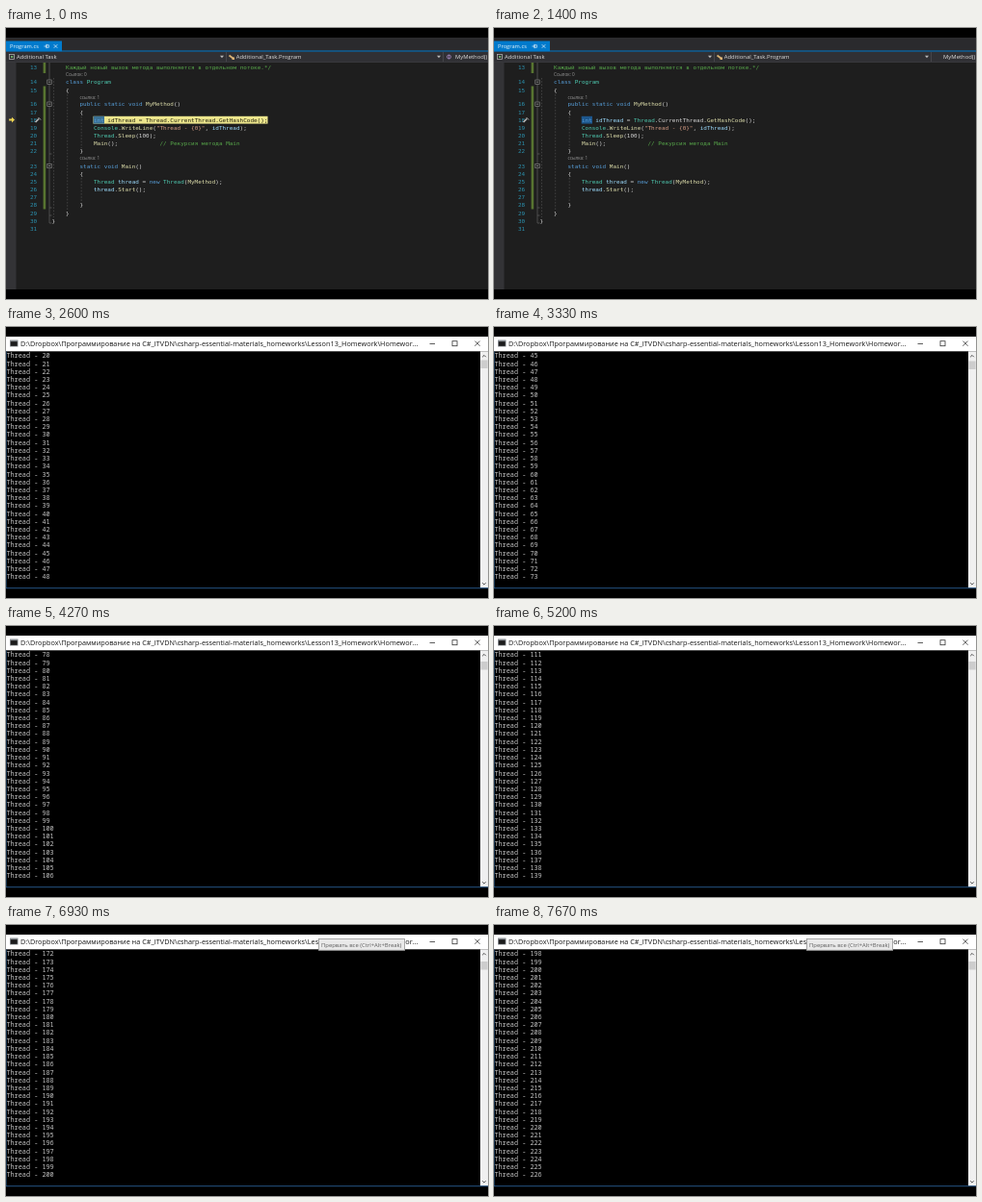
Write an HTML page with a canvas that moves like this. It is 500 px wide and 282 px high and loops after 7.74 s.

```html
<!DOCTYPE html>
<html lang="ru">
<head>
<meta charset="utf-8">
<title>Recursive threads</title>
<style>
html, body { margin: 0; width: 100%; height: 100%; overflow: hidden; background: #000; }
canvas { display: block; width: 500px; height: 282px; }
</style>
</head>
<body>
<canvas id="stage" width="500" height="282"></canvas>
<script>
const ctx = document.getElementById('stage').getContext('2d');

const LOOP = 7740;
const TICK = 200 / 3;
const RESUME_AT = 70;
const CONSOLE_AT = 1460;
const TOOLTIP_AT = 6520;

const MONO = '"DejaVu Sans Mono", monospace';
const CONSOLE = '"Noto Sans Mono", monospace';
const SANS = '"Open Sans", sans-serif';

const COLORS = {
  k: '#569cd6', t: '#4ec9b0', m: '#dcdcaa', v: '#9cdcfe',
  s: '#d69d85', c: '#57a64a', p: '#d4d4d4'
};
const COL = 3.61;
const CODE_X = 47.6;

// [line number, centre y, indent, colour key, text, colour key, text, ...]
const CODE = [
  [13, 41, 1, 'c', 'Каждый новый вызов метода выполняется в отдельном потоке.*/'],
  [14, 56.2, 1, 'k', 'class ', 't', 'Program'],
  [15, 64.5, 1, 'p', '{'],
  [16, 79.2, 2, 'k', 'public static void ', 'm', 'MyMethod', 'p', '()'],
  [17, 87.5, 2, 'p', '{'],
  [18, 95.6, 3, 'k', 'int ', 'v', 'idThread', 'p', ' = ', 't', 'Thread', 'p', '.CurrentThread.',
    'm', 'GetHashCode', 'p', '();'],
  [19, 103.8, 3, 't', 'Console', 'p', '.', 'm', 'WriteLine', 'p', '(', 's', '"Thread - {0}"',
    'p', ', ', 'v', 'idThread', 'p', ');'],
  [20, 112, 3, 't', 'Thread', 'p', '.', 'm', 'Sleep', 'p', '(100);'],
  [21, 120.1, 3, 'm', 'Main', 'p', '();            ', 'c', '// Рекурсия метода Main'],
  [22, 128.2, 2, 'p', '}'],
  [23, 143.5, 2, 'k', 'static void ', 'm', 'Main', 'p', '()'],
  [24, 151.6, 2, 'p', '{'],
  [25, 159.8, 3, 't', 'Thread ', 'v', 'thread', 'p', ' = ', 'k', 'new ', 't', 'Thread',
    'p', '(', 'm', 'MyMethod', 'p', ');'],
  [26, 168, 3, 'v', 'thread', 'p', '.', 'm', 'Start', 'p', '();'],
  [27, 176.1, 3],
  [28, 184.2, 2, 'p', '}'],
  [29, 192.4, 1, 'p', '}'],
  [30, 200.6, 0, 'p', '}'],
  [31, 208.9, 0]
];

function box(x, y, w, h, color) {
  ctx.fillStyle = color;
  ctx.fillRect(x, y, w, h);
}

// Laid out at ten times the size, so glyph advances are not rounded.
function text(str, x, midY, size, family, color) {
  ctx.save();
  ctx.translate(x, midY + size * 0.35);
  ctx.scale(0.1, 0.1);
  ctx.font = `${size * 10}px ${family}`;
  ctx.fillStyle = color;
  ctx.fillText(str, 0, 0);
  ctx.restore();
}

function line(points, color, width = 1, dash = []) {
  ctx.beginPath();
  points.forEach(([x, y], i) => i ? ctx.lineTo(x, y) : ctx.moveTo(x, y));
  ctx.strokeStyle = color;
  ctx.lineWidth = width;
  ctx.setLineDash(dash);
  ctx.stroke();
  ctx.setLineDash([]);
}

function frame(x, y, w, h, color, width = 0.7) {
  ctx.strokeStyle = color;
  ctx.lineWidth = width;
  ctx.strokeRect(x, y, w, h);
}

function shape(points, color) {
  ctx.beginPath();
  points.forEach(([x, y]) => ctx.lineTo(x, y));
  ctx.fillStyle = color;
  ctx.fill();
}

const dropArrow = x => shape([[x - 2, 28.8], [x + 2, 28.8], [x, 31.2]], '#b8b8b8');

function cross(x, y, r, color) {
  line([[x - r, y - r], [x + r, y + r]], color, 0.8);
  line([[x - r, y + r], [x + r, y - r]], color, 0.8);
}

function drawHeader(paused) {
  box(0, 10, 500, 15, '#2a2a2d');
  box(0, 13.5, 58, 11, '#007acc');
  box(0, 23.5, 500, 1.2, '#007acc');
  text('Program.cs', 4, 19, 5.7, SANS, '#f0f6fa');
  line([[39.5, 19], [42, 19]], '#d5e8f5', 0.8);
  line([[42, 16.8], [42, 21.2]], '#d5e8f5', 0.8);
  frame(42, 17.8, 2.6, 2.4, '#d5e8f5');
  cross(51.5, 19, 1.8, '#d5e8f5');

  box(0, 24.7, 500, 10.8, '#303034');
  box(0, 35, 500, 0.7, '#3f3f46');
  frame(3.5, 27.5, 5, 5, '#bdbdbd');
  box(5, 29, 2.2, 2, '#6ba766');
  text('Additional Task', 11, 30, 5.9, SANS, '#dedede');
  dropArrow(224);
  line([[228.5, 25], [228.5, 35]], '#46464b');
  line([[231.5, 28.5], [235.5, 31.5]], '#d9b274', 1.8);
  box(234.5, 30.5, 2.5, 2.5, '#d9b274');
  text('Additional_Task.Program', 238.7, 30, 5.9, SANS, '#dedede');
  dropArrow(449);
  line([[453.5, 25], [453.5, 35]], '#46464b');
  if (paused) {
    ctx.beginPath();
    ctx.arc(459.5, 30, 2, 0, Math.PI * 2);
    ctx.strokeStyle = '#a98bc4';
    ctx.lineWidth = 0.8;
    ctx.stroke();
    line([[459.5, 28], [459.5, 32]], '#a98bc4', 0.7);
  }
  text('MyMethod()', 466, 30, 5.9, SANS, '#dedede');
}

function drawGutter(paused) {
  box(0, 35.7, 10.5, 236.3, '#333336');
  box(38.6, 36, 2.6, 11, '#577430');
  box(38.6, 60.5, 2.6, 128, '#577430');

  line([[45, 36], [45, 203], [47.5, 203]], '#606060', 0.7);
  line([[45, 195], [47.5, 195]], '#606060', 0.7);
  line([[45, 187], [47.5, 187]], '#606060', 0.7);
  line([[45, 131], [47.5, 131]], '#606060', 0.7);
  for (const y of [56.2, 79.2, 143.5]) {
    box(42.8, y - 2.2, 4.4, 4.4, '#1e1e1e');
    frame(42.8, y - 2.2, 4.4, 4.4, '#909090', 0.6);
    line([[43.8, y], [46.2, y]], '#c0c0c0', 0.6);
  }

  const guide = (x, y1, y2) => line([[x, y1], [x, y2]], '#505050', 0.7, [1.6, 1.6]);
  guide(49.5, 52, 197);
  guide(63.7, 69, 189);
  guide(78.2, 92, 125);
  guide(78.2, 156, 181);

  if (paused) {
    shape([[3.2, 94.6], [6, 94.6], [6, 92.8], [9, 95.6], [6, 98.4], [6, 96.6], [3.2, 96.6]], '#f0d653');
  }
}

function drawCode(paused) {
  if (paused) box(90.5, 91.8, 181, 7.8, '#ece58c');
  box(90.7, 91.8, 11.3, 7.8, paused ? '#3b7194' : '#1d568c');

  for (const [number, y, indent, ...parts] of CODE) {
    text(String(number), 25, y, 6, MONO, '#2b91af');
    let column = indent * 4;
    for (let i = 0; i < parts.length; i += 2) {
      const onYellow = paused && number === 18 && i > 0;
      text(parts[i + 1], CODE_X + column * COL, y, 6, MONO, onYellow ? '#25230f' : COLORS[parts[i]]);
      column += parts[i + 1].length;
    }
  }
  text('Ссылок: 0', 62, 48.7, 4.65, SANS, '#999');
  text('ссылка: 1', 76.5, 72, 4.65, SANS, '#999');
  text('ссылка: 1', 76.5, 135.8, 4.65, SANS, '#999');

  line([[30.5, 98], [34, 94.5]], '#b5b5b5', 1.7);
  line([[33.5, 93], [36, 95.5]], '#b5b5b5', 1);
}

function drawEditor(paused) {
  box(0, 10, 500, 262, '#1e1e1e');
  drawHeader(paused);
  drawGutter(paused);
  drawCode(paused);
}

function drawTitleBar() {
  box(0, 10, 500, 15.3, '#fff');
  box(4, 13.5, 8.5, 7, '#8a8f94');
  box(4.8, 15.2, 6.9, 4.6, '#1b1b1b');
  const path = 'D:\\Dropbox\\Программирование на C#_ITVDN\\csharp-essential-materials_homeworks' +
    '\\Lesson13_Homework\\Homewor...';
  text(path, 15, 17.2, 7.29, SANS, '#151515');
  line([[439.5, 17.5], [445, 17.5]], '#333', 0.8);
  frame(463, 14.7, 5, 5, '#333', 0.8);
  cross(489, 17.2, 2.6, '#333');
}

function drawScrollBar(time) {
  const top = 34.5 + (time >= 3060) + 1.5 * (time >= 3990) + (time >= 5460);
  box(492, 25.3, 8, 246.2, '#f0f0f0');
  box(492.4, top, 7.2, 8.5, '#cdcdcd');
  line([[494.2, 31.2], [496, 29.4], [497.8, 31.2]], '#505050');
  line([[494.2, 266.3], [496, 268.1], [497.8, 266.3]], '#505050');
}

function drawConsole(time) {
  box(0, 10, 500, 262, '#000');
  drawTitleBar();

  const tick = Math.floor((time + 5) / TICK);
  const last = Math.floor(2.34 * tick - 43.05);
  const first = Math.max(3, last - 28);
  for (let n = first; n <= last; n++) {
    text('Thread - ' + n, 0.4, 30 + (n - first) * 8.21, 6.85, CONSOLE, '#c4c4c4');
  }

  drawScrollBar(time);
  box(0, 25.3, 0.6, 246.7, '#24507c');
  box(0, 271.3, 500, 0.9, '#2a5f94');

  if (time >= TOOLTIP_AT) {
    box(324, 14, 90, 12.5, '#e9e9e9');
    frame(324.4, 14.4, 89.2, 11.8, '#8c8c8c');
    text('Прервать все (Ctrl+Alt+Break)', 327, 20.5, 5.9, SANS, '#5c5c5c');
  }
}

const start = performance.now();

function draw(now) {
  const time = Math.max(0, now - start) % LOOP;
  box(0, 0, 500, 282, '#000');
  if (time < CONSOLE_AT) drawEditor(time < RESUME_AT);
  else drawConsole(time);
  requestAnimationFrame(draw);
}

draw(start);
</script>
</body>
</html>
```
